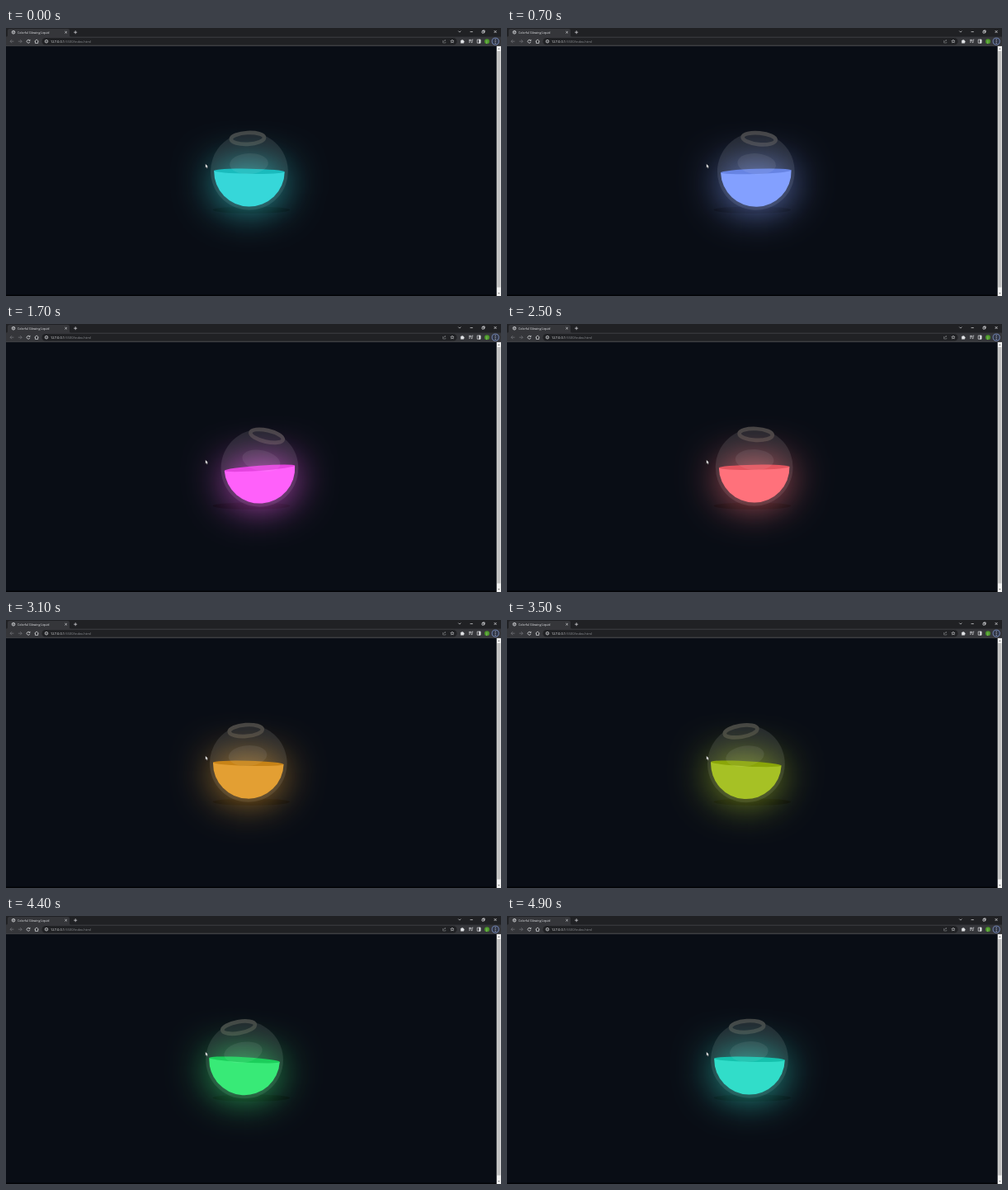
An HTML page for the animation above (5000 ms loop, 600 by 325 pixels).

```html
<!DOCTYPE html>
<html lang="en">
<head>
<meta charset="utf-8">
<title>Colorful Glowing Liquid</title>
<style>
  html, body { margin: 0; width: 100%; height: 100%; overflow: hidden; background: #090d15; }
  svg { display: block; width: 100vw; height: 100vh; }
  text { font-family: "Open Sans", "Noto Sans", sans-serif; }
  .icon { fill: none; stroke: #e2e4e7; stroke-width: .7; }
  .dim { stroke: #77797d; }
  .solid { fill: #e2e4e7; }
  #glow { filter: blur(25px); }
</style>
</head>
<body>
<svg viewBox="0 0 600 325">
  <rect width="600" height="325" fill="#090d15"/>
  <rect y="323.5" width="595" height="1.5" fill="#030406"/>

  <!-- bowl, drawn around its centre -->
  <g transform="translate(297.3 173.7)">
    <ellipse cy="46.9" rx="46.9" ry="4.3" fill="#000" fill-opacity=".5"/>
    <g id="bowl">
      <circle r="46.9" fill="#fff" fill-opacity=".1"/>
      <ellipse cy="-39.9" rx="20.1" ry="6.9" fill="none" stroke="#444" stroke-width="4.7"/>
      <g id="liquid">
        <g id="glow">
          <path d="M-42.8 0A42.8 42.8 0 0 0 42.8 0Z"/>
          <ellipse rx="42.8" ry="3.1"/>
        </g>
        <path id="body" d="M-42.8 0A42.8 42.8 0 0 0 42.8 0Z"/>
        <ellipse id="surface" rx="42.8" ry="3.1"/>
      </g>
      <ellipse cy="-9.2" rx="23.4" ry="12.5" fill="#fff" fill-opacity=".07"/>
    </g>
  </g>

  <!-- scrollbar -->
  <rect x="594.7" y="22" width="5.3" height="303" fill="#f1f1f1"/>
  <rect x="595.2" y="28" width="4.3" height="286.5" fill="#c1c1c1"/>
  <path d="M596.2 25.8l1.2-1.4 1.2 1.4zM596.2 321.2l1.2 1.4 1.2-1.4z" fill="#555"/>

  <!-- tab strip -->
  <rect width="600" height="11" fill="#202124"/>
  <path d="M0 11Q2 11 2 9V3Q2 1 4 1H75Q77 1 77 3V9Q77 11 79 11Z" fill="#35363a"/>
  <rect y="10.6" width="600" height="11.4" fill="#35363a"/>
  <rect y="21.6" width="600" height=".5" fill="#4a4b4f"/>
  <g class="icon">
    <circle cx="9" cy="5.2" r="1.9"/>
    <path d="M7.4 4.6l1.5.6.4 1.5M9.2 3.5l.5 1 1 .4"/>
    <path d="M71.4 4l2.4 2.4m0-2.4l-2.4 2.4M82.2 5.2h4m-2-2v4"/>
    <path d="M548.3 3.6l1.5 1.5 1.5-1.5M562.6 4.6h3.2M577 3.7h2.4v2.4h-2.4zM577.8 3.7v-.8h2.4v2.4h-.8M591.6 3l3 3m0-3l-3 3"/>
  </g>
  <text transform="translate(14 6.6) scale(.3125)" font-size="11.4" fill="#e8eaed">Colorful Glowing Liquid</text>

  <!-- toolbar -->
  <rect x="43.5" y="11.9" width="503" height="8.7" rx="4.35" fill="#202124"/>
  <g class="icon">
    <path class="dim" d="M9.4 16.2H5m2-2l-2 2 2 2M14.8 16.2h4.4m-2-2l2 2-2 2"/>
    <path d="M28.6 15.1a1.9 1.9 0 1 0 .3 1.7M29 13.9v1.5h-1.5"/>
    <path d="M34.6 16.2l2.5-2.2 2.5 2.2M35.5 15.8v2.6h3.2v-2.6"/>
    <circle cx="49" cy="16.2" r="1.8"/>
    <path d="M49 16v1.2M49 15v.4"/>
    <path class="dim" d="M529.6 15v3h3.2v-1M530.4 16.7q.3-1.7 2.2-1.7m-.8-1l1 1-1 1"/>
    <path d="M540.9 14l.6 1.4 1.5.1-1.1 1 .3 1.5-1.3-.8-1.3.8.3-1.5-1.1-1 1.5-.1z" stroke-width=".5"/>
    <path class="solid" d="M551.3 15h1.1a.7.7 0 0 1 1.4 0h.9v1a.7.7 0 0 1 0 1.4v.9h-3.4z" stroke-width=".4"/>
    <path d="M561 14.4h3M561 15.8h3M561 17.2h1.6M565 14.2v3.4h-1.2M565 14.2h1.2"/>
    <path d="M571.2 14.1h3.8v4.1h-3.8z"/>
    <path class="solid" d="M573.5 14.1h1.5v4.1h-1.5z" stroke-width=".4"/>
  </g>
  <text transform="translate(54 17.8) scale(.3125)" font-size="13" fill="#e8eaed">127.0.0.1<tspan fill="#8e9196">:5500/index.html</tspan></text>
  <circle cx="583" cy="16.2" r="3" fill="#4d9a2a"/>
  <text transform="translate(583 17.5) scale(.3125)" font-size="11" text-anchor="middle" fill="#fff">J</text>
  <circle cx="593.2" cy="16.2" r="4.1" fill="#303647" stroke="#8fa8e6" stroke-width=".7"/>
  <path d="M593.2 14.1v.01M593.2 16.2v.01M593.2 18.3v.01" stroke="#fff" stroke-width="1" stroke-linecap="round"/>

  <!-- pointer -->
  <path d="M241.8 164.8v4.6l1-.9.8 1.7.8-.4-.8-1.6h1.4z" fill="#fff" stroke="#111" stroke-width=".25"/>
</svg>
<script>
  const LOOP = 5000, STEP = 100, LEAD = 240;
  const SWING = 15, SLOSH = 20, PIVOT = 46.9;
  // mean, amplitude and peak angle of each colour channel over the hue cycle
  const HUE = [[172, 126, 142], [164, 70, 300], [170, 133, 52]];
  const $ = id => document.getElementById(id);
  const bowl = $('bowl'), liquid = $('liquid'), glow = $('glow'), body = $('body'), surface = $('surface');

  const triangle = p => Math.asin(Math.sin(p * 2 * Math.PI)) * 2 / Math.PI;

  function tint(p, shade = 0) {
    const rgb = HUE.map(([mean, amp, peak]) => {
      const v = mean + amp * Math.cos((p * 360 - peak) * Math.PI / 180);
      return Math.round(Math.max(0, Math.min(255, v) - shade));
    });
    return `rgb(${rgb})`;
  }

  function draw(ms) {
    const t = Math.floor(ms % LOOP / STEP) * STEP;
    const p = (t - LEAD) / LOOP;
    const s = triangle(p);
    bowl.setAttribute('transform', `rotate(${s * SWING} 0 ${PIVOT})`);
    liquid.setAttribute('transform', `rotate(${-s * SLOSH})`);
    const color = tint(p);
    glow.setAttribute('fill', color);
    body.setAttribute('fill', color);
    surface.setAttribute('fill', tint(p, 28));
  }

  const start = performance.now();
  function tick() {
    draw(performance.now() - start);
    requestAnimationFrame(tick);
  }
  tick();
</script>
</body>
</html>
```
